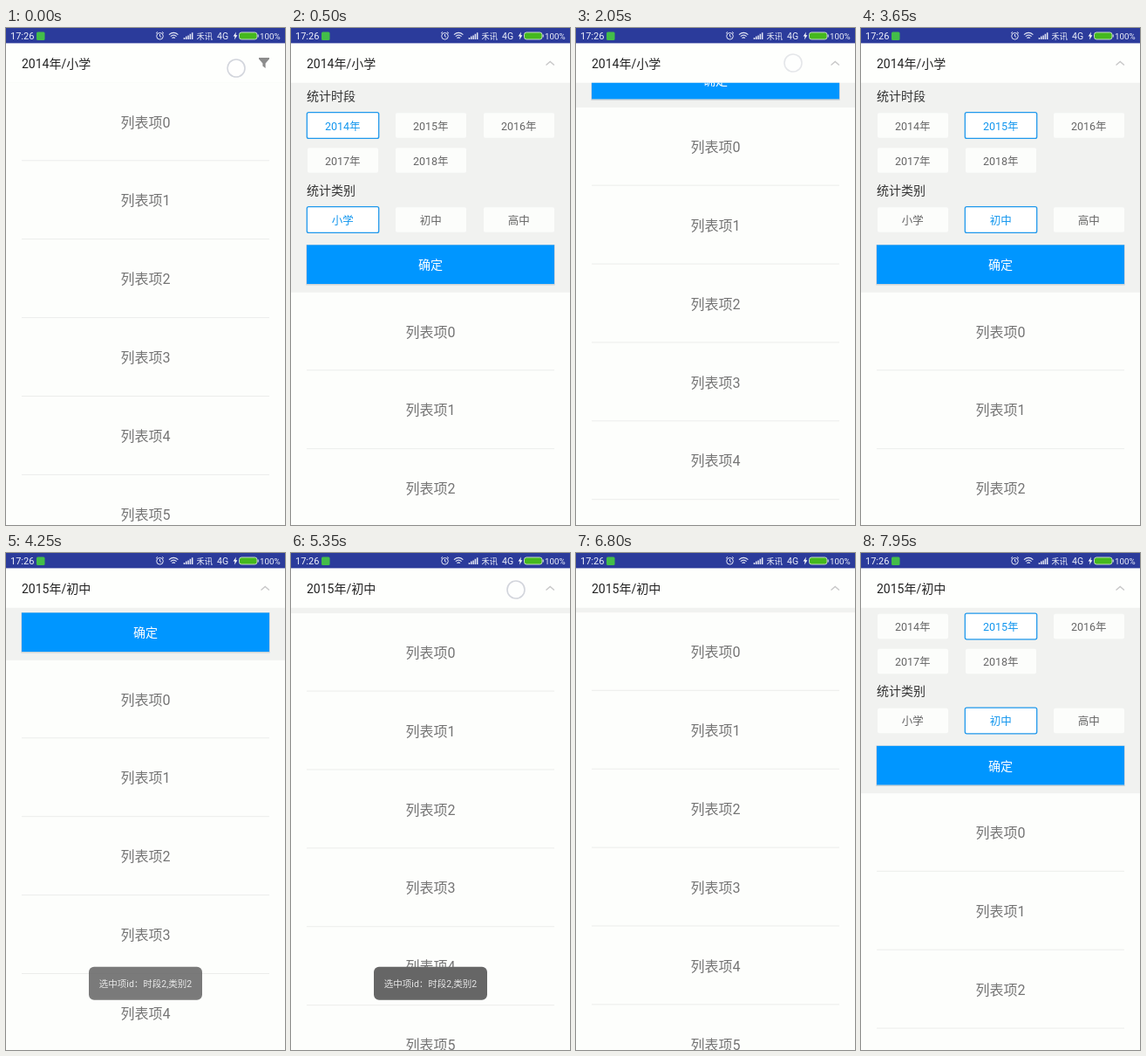
An HTML page for the animation above (8 s loop, 320 by 569 pixels).

```html
<!DOCTYPE html>
<html lang="zh-CN">
<head>
<meta charset="utf-8">
<style>
  html, body { margin: 0; width: 100%; height: 100%; overflow: hidden; background: #fdfefc; }
  svg { display: block; width: 100vw; height: 100vh; font-family: Roboto, "Noto Sans CJK SC", "Noto Sans CJK", sans-serif; }
</style>
</head>
<body>
<svg id="stage" viewBox="0 0 320 569">
  <defs><clipPath id="body"><rect y="62.5" width="320" height="507"/></clipPath></defs>
  <rect width="320" height="569" fill="#fdfefc"/>
  <g clip-path="url(#body)">
    <g id="list"></g>
    <g id="panel">
      <rect y="62" width="320" height="240.7" fill="#f1f2f0"/>
      <rect x="17.3" y="248" width="285.4" height="46.5" fill="#cdd3d6"/>
      <rect x="18" y="248.4" width="284" height="44.6" fill="#0096ff"/>
    </g>
  </g>
  <g id="header">
    <rect y="17" width="320" height="45.5" fill="#fefffd"/>
    <path id="funnel" d="M290 34h12v1.6l-4.4 5v5.4l-3.2-2.4v-3l-4.4-5z" fill="#8c8c8c"/>
    <path id="chevron" d="M292.5 42.5l4.7-4 4.7 4" fill="none" stroke="#c8c8c8" stroke-width="1.4"/>
  </g>
  <g id="status" fill="none" stroke="#e4e7f5">
    <rect width="320" height="17.4" fill="#2b3b9b" stroke="none"/>
    <rect x="35" y="4.5" width="9.5" height="9.5" rx="1.5" fill="#43bd49" stroke="none"/>
    <circle cx="176.5" cy="9.3" r="3.8"/>
    <path d="M176.5 7v2.5l1.7 1M172 6.2l2-1.8M181 6.2l-2-1.8"/>
    <path d="M187 7.6q5.2-4.6 10.4 0M188.8 9.6q3.4-3 6.8 0M190.5 11.5q1.7-1.4 3.4 0" stroke-width="1.2"/>
    <path d="M204.5 13v-2M206.8 13v-3.4M209.1 13V8.4M211.4 13V6.8M213.7 13V5.2" stroke-width="1.5"/>
    <path d="M264 4.5l-3.3 5h2l-.8 4 3.5-5.2h-2.1z" fill="#fff" stroke="none"/>
    <rect x="267.5" y="5" width="20.5" height="8" rx="2.6" fill="#45b81e" stroke="#d5e6d2" stroke-width=".9"/>
    <path d="M289.2 7.5v3"/>
  </g>
  <g id="toast"><rect x="95" y="473.7" width="130" height="38" rx="6" fill="#666"/></g>
  <circle id="touch" r="10" fill="#fff" fill-opacity=".65" stroke="#d2d5dc" stroke-width="1.6"/>
</svg>
<script>
const LOOP = 8000, SLIDE = 300, OPEN = 240, ROW = 89.9;
const $ = id => document.getElementById(id);

function setAll(el, attrs) {
  for (const k in attrs) el.setAttribute(k, attrs[k]);
  return el;
}
function add(parent, tag, attrs) {
  return parent.appendChild(setAll(document.createElementNS('http://www.w3.org/2000/svg', tag), attrs));
}
// Text placed by its vertical centre
function label(parent, text, x, cy, size, fill, anchor = 'start') {
  const el = add(parent, 'text', { x, y: cy + size * .37, 'font-size': size, fill, 'text-anchor': anchor });
  el.textContent = text;
  return el;
}

for (let i = 0; i < 7; i++) {
  const top = 62.7 + i * ROW;
  label($('list'), '列表项' + i, 160, top + 44.9, 16, '#757575', 'middle');
  add($('list'), 'rect', { x: 18, y: top + 88.6, width: 284, height: 1, fill: '#ecedeb' });
}

function chip(text, col, cy) {
  const x = 17.6 + col * 101;
  const box = add($('panel'), 'rect', { rx: 2 });
  const name = label($('panel'), text, x + 41.6, cy, 12.5, '#666', 'middle');
  return on => {
    const d = on ? .7 : 1.4;
    setAll(box, {
      x: x + d, y: cy - 16.1 + d, width: 83.8 - 2 * d, height: 31.2 - 2 * d,
      fill: on ? '#fff' : '#fcfdfb', stroke: on ? '#1f98ec' : 'none', 'stroke-width': 1.3
    });
    name.setAttribute('fill', on ? '#1296ee' : '#666');
  };
}
label($('panel'), '统计时段', 18, 77.8, 14, '#333');
label($('panel'), '统计类别', 18, 185.8, 14, '#333');
label($('panel'), '确定', 160, 271, 14, '#fff', 'middle');
const years = [2014, 2015, 2016, 2017, 2018].map((y, i) => chip(y + '年', i % 3, i < 3 ? 112 : 152));
const kinds = ['小学', '初中', '高中'].map((k, i) => chip(k, i, 220));

const title = label($('header'), '', 18, 40.5, 14, '#222');
for (const [text, x, size] of [['17:26', 5, 11], ['禾讯', 218.5, 9.3], ['4G', 242, 10.5], ['100%', 291, 9.8]])
  label($('status'), text, x, 9.3, size, '#edf0fa').setAttribute('stroke', 'none');
label($('toast'), '选中项id：时段2,类别2', 160, 492.8, 10.5, '#e6e6e6', 'middle');

// Slide starts, alternately opening and closing
const slides = [130, 1080, 1984, 4051, 5320, 6530, 7717];
// Taps: time, x, y
const taps = [[-80, 264, 46], [1000, 258, 42], [1900, 249, 40], [2750, 160, 112], [3300, 160, 220],
  [3950, 166, 272], [5250, 258, 42], [6450, 258, 42], [7650, 256, 42]];

const ramp = (t, from, to) => Math.min(1, Math.max(0, (t - from) / (to - from)));
const ease = p => (1 - Math.cos(Math.PI * p)) / 2;

function draw(t) {
  const shown = OPEN * slides.reduce((sum, s, i) => sum + (i % 2 ? -1 : 1) * ease(ramp(t, s, s + SLIDE)), 0);
  $('list').setAttribute('transform', `translate(0 ${shown})`);
  $('panel').setAttribute('transform', `translate(0 ${shown - OPEN})`);
  const open = shown > .01;
  $('funnel').style.display = open ? 'none' : '';
  $('chevron').style.display = open ? '' : 'none';

  years.forEach((set, i) => set(i === (t < 2880 ? 0 : 1)));
  kinds.forEach((set, i) => set(i === (t < 3430 ? 0 : 1)));
  title.textContent = t < 4050 ? '2014年/小学' : '2015年/初中';

  const fadeIn = 1 - (1 - ramp(t, 4050, 4370)) ** 2;
  $('toast').setAttribute('opacity', fadeIn * (1 - ramp(t, 6100, 6600)));

  const tap = taps.find(([at]) => t >= at && t < at + 220);
  $('touch').style.display = tap ? '' : 'none';
  if (tap) setAll($('touch'), { cx: tap[1], cy: tap[2], opacity: 1 - ramp(t, tap[0] + 100, tap[0] + 220) });
}

const begin = performance.now();
function tick() {
  draw((performance.now() - begin) % LOOP);
  requestAnimationFrame(tick);
}
tick();
</script>
</body>
</html>
```
